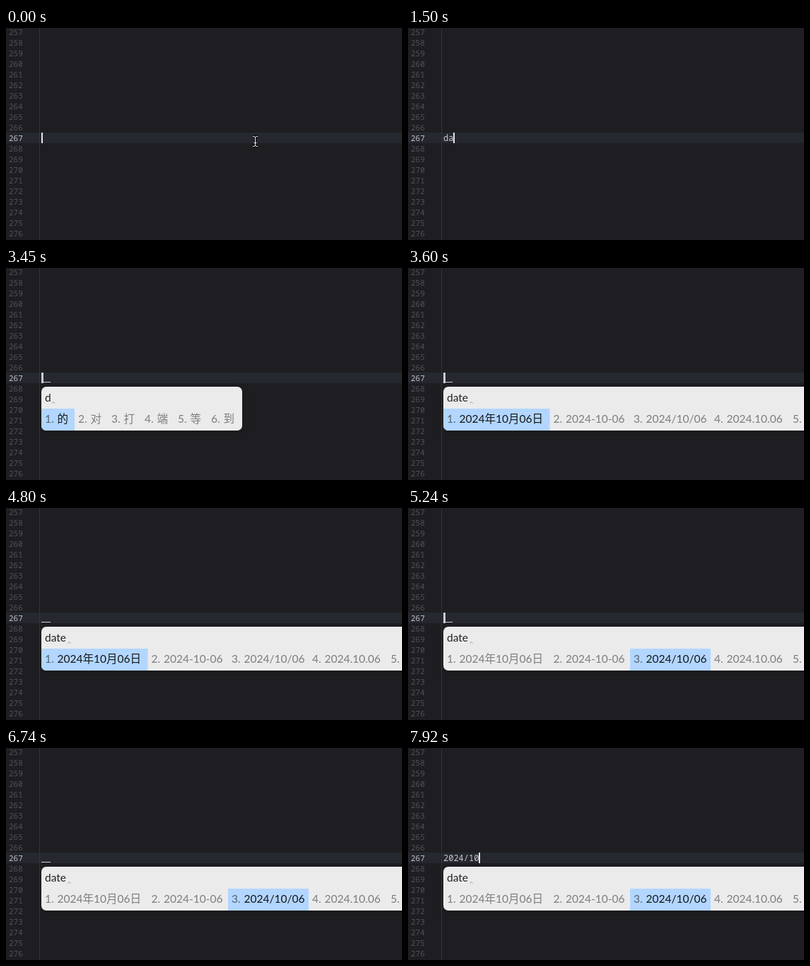
An HTML page with a canvas that plays this animation: 560x300 px, repeating every 8 s.

```html
<!DOCTYPE html>
<html lang="en">
<head>
<meta charset="utf-8">
<title>Typing a date with an input method</title>
<style>
  html, body { margin: 0; width: 100%; height: 100%; overflow: hidden; background: #1e1e22; }
  canvas { display: block; }
</style>
</head>
<body>
<canvas id="stage" width="560" height="300"></canvas>
<script>
const ctx = document.getElementById('stage').getContext('2d');
const LOOP = 8000, ROW = 15, CELL = 7.2, LEFT = 50;
const MONO = '"Noto Sans Mono", monospace';
const PANEL_FONT = '15.5px Lato, "Noto Sans CJK SC", "Noto Sans CJK", sans-serif';

// Each step is [start time, value]; the latest one reached applies.
const typed = [[0, ''], [900, 'd'], [1500, 'da'], [2100, 'd'], [2550, ''],
  [7480, '20'], [7630, '202'], [7770, '2024/'], [7920, '2024/10']];
const caretOn = [[0, true], [600, false], [900, true], [4800, false], [5240, true],
  [5690, false], [6290, true], [6740, false], [7190, true]];
const selection = [[0, 0], [4950, 1], [5240, 2], [5540, 3], [6590, 2]];

const short = {
  query: 'd', markX: 67, right: 334,
  words: ['的', '对', '打', '端', '等', '到'],
  edges: [50, 97, 144, 191, 238, 285, 334]
};
const long = {
  query: 'date', markX: 89.5, right: 580,
  words: ['2024年10月06日', '2024-10-06', '2024/10/06', '2024.10.06', ''],
  edges: [50, 200.5, 314, 428, 539, 580]
};

const at = (steps, t) => steps.filter(([start]) => start <= t).pop()[1];

function rect(color, x, y, w, h) {
  ctx.fillStyle = color;
  ctx.fillRect(x, y, w, h);
}

function text(string, x, y, color, font) {
  ctx.font = font;
  ctx.fillStyle = color;
  ctx.fillText(string, x, y);
}

function drawEditor() {
  rect('#1e1e22', 0, 0, 560, 300);
  rect('#25282e', 0, 148, 560, ROW);
  rect('#34343a', 47, 0, 1, 300);
  for (let i = 0; i < 20; i++) {
    text(257 + i, 4, 10 + i * ROW, i === 10 ? '#c3c5ca' : '#505157', '11px ' + MONO);
  }
}

function drawPointer() {
  const beam = new Path2D('M349 153.5h1.5q2 0 2 2v10q0 2-2 2h-1.5' +
    'M356 153.5h-1.5q-2 0-2 2v10q0 2 2 2h1.5M350.5 162.5h4');
  for (const [color, width] of [['#000', 3], ['#fff', 1]]) {
    ctx.strokeStyle = color;
    ctx.lineWidth = width;
    ctx.stroke(beam);
  }
}

function drawInput(t) {
  const string = at(typed, t);
  const composing = t >= 3300 && t < 7480;
  text(string, LEFT, 160, '#c6c8cc', '12px ' + MONO);
  if (composing) rect('#c6c8cc', LEFT, 161, 13, 1);
  if (at(caretOn, t)) {
    const x = Math.round(LEFT + string.length * CELL);
    rect(composing ? '#c9cbd0' : '#e4e5e8', x, 148, composing ? 3 : 2, ROW);
  }
}

function drawPanel(panel, selected) {
  ctx.save();
  ctx.beginPath();
  ctx.roundRect(LEFT, 168, panel.right - LEFT, 62, 7);
  ctx.shadowColor = 'rgba(0, 0, 0, .15)';
  ctx.shadowBlur = 10;
  ctx.shadowOffsetY = 4;
  ctx.fillStyle = '#ebebeb';
  ctx.fill();
  ctx.shadowColor = 'transparent';
  ctx.clip();

  text(panel.query, 55, 189, '#202020', PANEL_FONT);
  ctx.strokeStyle = '#929292';
  ctx.lineWidth = 1;
  ctx.stroke(new Path2D(`M${panel.markX - 2} 191.5l2-2l2 2`));

  panel.words.forEach((word, i) => {
    const x = panel.edges[i], active = i === selected;
    if (active) rect('#b2d6ff', x, 199, panel.edges[i + 1] - x, 31);
    text(i + 1 + '.', x + 5, 219, active ? '#55616f' : '#7d7d7d', PANEL_FONT);
    text(word, x + 22.5, 219, active ? '#141619' : '#7d7d7d', PANEL_FONT);
  });
  ctx.restore();
}

function draw(now) {
  const t = now % LOOP;
  drawEditor();
  drawInput(t);
  if (t < 900) drawPointer();
  if (t >= 3450) drawPanel(t < 3600 ? short : long, at(selection, t));
  requestAnimationFrame(draw);
}

draw(0);
</script>
</body>
</html>
```
